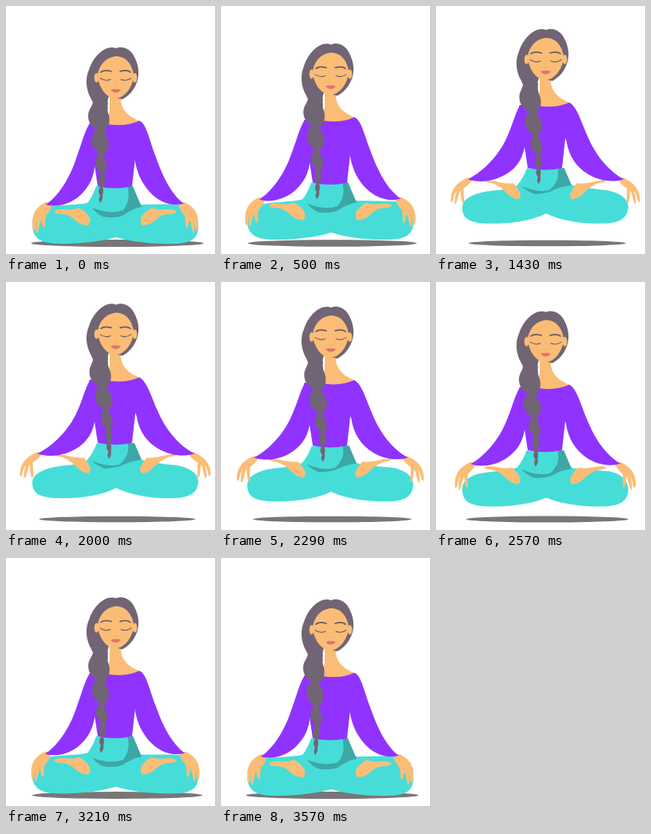
An HTML page for the animation above (3.64 s loop, 262x311 px).

```html
<!DOCTYPE html>
<html lang="en">
<head>
<meta charset="utf-8">
<title>Levitating meditation</title>
<style>
html, body { margin: 0; width: 100%; height: 100%; overflow: hidden; background: #fff; }
svg { display: block; width: 100vw; height: 100vh; }
.skin { fill: #fbbd76; }
.hair { fill: #716474; }
.top { fill: #9033ff; }
.pants { fill: #46ddd9; }
.fold { fill: #3da7a6; }
.line { fill: none; stroke: #6b5b68; stroke-linecap: round; }
</style>
</head>
<body>
<svg viewBox="0 0 262 311">
  <ellipse id="shadow" cx="139.5" cy="297.5" fill="#777"/>

  <!-- data-up holds the same path in the raised pose -->
  <path class="pants"
    d="M113 226 Q108 240 102 247 C85 250 62 249 46 253 C36 256 33 264 33 274 C33 290 42 297 62 298 C90 299 120 295 138 290 C158 296 186 299 214 298 C234 297 242 290 241 274 C240 262 235 252 222 249 C200 248 180 249 169 249 Q164 240 159 226Z"
    data-up="M114 201 Q109 214 102 222 C92 231 62 227 46 236 C36 241 33 245 33 251 C33 264 42 269 62 270 C90 271 120 267 138 257 C158 267 186 271 212 270 C232 269 241 262 241 248 C240 238 229 232 213 229 C200 228 180 225 170 222 Q165 213 161 201Z"/>
  <path class="fold"
    d="M152 226 Q157 243 147 256 Q130 262 108 253 Q113 260 121 264 Q134 267 146 263 Q160 253 170 252 L159 226Z"
    data-up="M152 200 Q157 215 142 228 Q129 232 107 223 Q115 230 124 233 Q134 232 142 230 Q157 223 170 222 L161 201Z"/>

  <path id="foot" class="skin"
    d="M60 258 Q64 254 74 255 Q85 256 91 253 Q101 258 105 266 Q106 273 103 275 Q94 275 87 269 Q80 261 70 261 Q62 261 60 258Z"
    data-up="M60 215 Q63 213 74 216 Q88 220 98 219 Q103 225 106 232 Q106 237 103 239 Q95 238 88 230 Q80 222 70 218 Q62 217 60 215Z"/>
  <use href="#foot" transform="translate(274) scale(-1 1)"/>

  <path id="hand" class="skin"
    d="M50 246 Q37 252 34 263 Q32 273 34 281 Q36 283 37 279 Q37 272 39 268 Q37 275 38 284 Q40 285 41 280 Q42 273 44 268 Q45 272 46 277 Q48 279 49 276 Q49 269 50 263 Q56 258 58 247Z"
    data-up="M38 212 Q24 219 20 227 Q16 234 17 242 Q19 243 20 239 Q21 232 25 228 Q21 236 22 244 Q24 245 25 240 Q27 232 29 227 Q30 237 31 243 Q33 245 34 242 Q33 233 33 225 Q40 221 46 213Z"/>
  <use href="#hand" transform="translate(274) scale(-1 1)"/>

  <g class="lift">
    <path class="skin" d="M130 103 L145 103 L144 119 Q146 136 167 144 L150 154 L120 154 Q129 140 130 130Z"/>
    <path class="top" d="M104 148 Q112 144 126 148 Q150 152 167 144 Q171 146 174 153 L162 190 L158 226 Q137 231 115 226 L111 200Z"/>
  </g>
  <path class="top"
    d="M105 147 C98 158 95 172 88 191 C80 216 66 238 50 249 C63 253 78 249 90 240 C102 230 109 218 111 203 L120 160Z"
    data-up="M106 121 C99 132 96 148 88 164 C78 185 59 204 39 214 C53 219 70 217 84 210 C98 203 108 192 111 174 L120 135Z"/>
  <path class="top"
    d="M167 144 C176 147 179 166 187 187 C196 213 207 236 223 248 C209 251 197 248 185 238 C173 227 164 212 161 190 L152 160Z"
    data-up="M167 119 C176 122 182 142 190 160 C200 184 217 204 237 214 C222 219 205 216 191 208 C177 200 167 187 164 168 L152 135Z"/>

  <g class="lift">
    <path class="hair" d="M138 53 C147 49 157 55 161 64 C168 77 168 92 160 104 Q155 112 146 117 L129 113 Q126 121 128 130 L109 130 Q111 124 107 117 C100 105 99 91 104 80 C110 62 125 48 138 53Z"/>
    <path id="braid" class="hair" d="M109 121 C107 128 103 130 103 138 C103 148 109 151 113 156 C106 162 106 172 110 178 C112 181 115 182 116 186 C111 191 111 201 115 205 C117 207 118 208 118 210 C115 215 115 222 118 227 Q114 233 118 238 Q115 242 118 247 Q122 242 121 237 Q123 232 121 227 Q125 223 124 216 Q123 212 124 209 C128 204 127 196 123 190 Q122 187 124 185 C130 179 130 170 126 164 Q123 160 124 156 C130 151 131 142 128 134 Q126 128 128 121Z"/>
    <ellipse class="skin" cx="113.500" cy="90" rx="2.8" ry="6"/>
    <ellipse class="skin" cx="161.500" cy="90" rx="2.8" ry="6"/>
    <path class="skin" d="M139 63 C128 63 117 72 115 86 C115 101 126 116 137 116 C148 116 160 101 160 86 C158 72 149 63 139 63Z"/>
    <path class="line" stroke-width="1.7" d="M119 83 Q123 79.500 132 82 M143 82 Q152 79.500 156 83"/>
    <path class="line" stroke-width="1.1" d="M118 90.500 Q125 95 131 92 M144 92 Q150 95 157 90.500"/>
    <path fill="none" stroke="#eaa566" stroke-width=".8" d="M135 100 Q137 101.500 140 100"/>
    <path fill="#e07370" d="M131 105.500 Q135 103 137.500 104.500 Q140 103 144 105.500 Q138 112 131 105.500Z"/>
  </g>
</svg>
<script>
const LOOP = 3640, FPS = 14, HALF = 25, RISE = 25.5;
const number = /-?\d+(\.\d+)?/g;
const shadow = document.getElementById('shadow');
const braid = document.getElementById('braid');
const lifted = document.querySelectorAll('.lift');
const morphs = [...document.querySelectorAll('[data-up]')].map(el => ({
  el, down: el.getAttribute('d'), up: el.dataset.up.match(number)
}));

function mix(down, up, p) {
  let i = 0;
  return down.replace(number, n => (+n + (up[i++] - n) * p).toFixed(2));
}

function draw(now) {
  const step = Math.floor(now % LOOP * FPS / 1000 + 0.05);
  const p = (1 - Math.cos(Math.PI * step / HALF)) / 2;
  for (const { el, down, up } of morphs) el.setAttribute('d', mix(down, up, p));
  for (const el of lifted) el.setAttribute('transform', `translate(0 ${-RISE * p})`);
  braid.setAttribute('transform', `rotate(${-5.3 * p} 116 120)`);
  shadow.setAttribute('rx', 108 - 10.5 * p);
  shadow.setAttribute('ry', 4.5 - 0.8 * p);
}

const start = performance.now();
function tick() {
  draw(performance.now() - start);
  requestAnimationFrame(tick);
}
tick();
</script>
</body>
</html>
```
